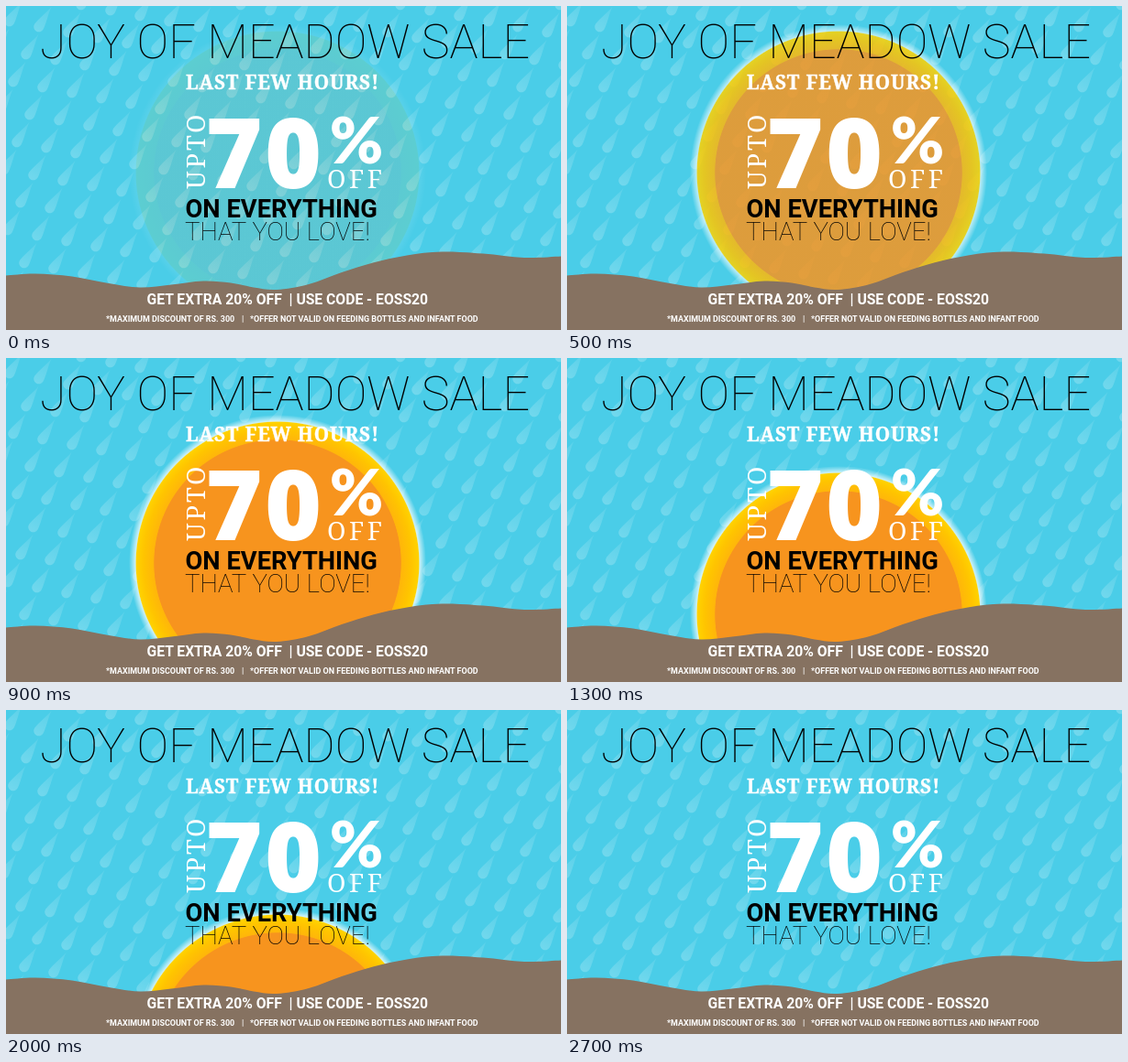
These frames come from a looping animation (605 px wide and 354 px high, 2.8 s). An HTML page:

```html
<!DOCTYPE html>
<html lang="en">
<head>
<meta charset="utf-8">
<title>Sale banner</title>
<style>
  html, body { margin: 0; width: 100%; height: 100%; overflow: hidden; background: #4acde8; }
  svg { display: block; width: 605px; height: 354px; }
  .sans { font-family: Roboto, sans-serif; }
  .slab { font-family: "Noto Serif", serif; fill: #fff; }
  .figure { font-family: "Open Sans", sans-serif; font-weight: 800; fill: #fff; text-anchor: middle; }
  .percent { font-family: Lato, sans-serif; font-weight: 900; fill: #fff; text-anchor: middle; }
  .thin { font-weight: 100; fill: #000; }
  .note { font-weight: 700; fill: #fff; }
</style>
</head>
<body>
<svg viewBox="0 0 605 354" xmlns="http://www.w3.org/2000/svg">
  <defs>
    <linearGradient id="dropFill" x1="0" y1="0" x2="0" y2="1">
      <stop offset="0" stop-color="#fff" stop-opacity=".08"/>
      <stop offset="1" stop-color="#fff" stop-opacity=".22"/>
    </linearGradient>
    <path id="drop" d="M0-18C1-9 5.5 2 5.5 8A5.5 5.5 0 0 1-5.5 8C-5.5 2-1-9 0-18Z" fill="url(#dropFill)"/>
    <radialGradient id="sunFill" gradientUnits="userSpaceOnUse" cx="0" cy="0" r="162">
      <stop offset="0" stop-color="#f7941e"/>
      <stop offset=".829" stop-color="#f7941e"/>
      <stop offset=".834" stop-color="#ffb60a"/>
      <stop offset=".9" stop-color="#ffc400"/>
      <stop offset=".95" stop-color="#ffd200"/>
      <stop offset=".957" stop-color="#fff" stop-opacity=".7"/>
      <stop offset="1" stop-color="#fff" stop-opacity="0"/>
    </radialGradient>
  </defs>

  <rect width="605" height="354" fill="#4acde8"/>
  <g id="rain"></g>
  <circle id="sun" r="162" fill="url(#sunFill)"/>
  <path id="dune" fill="#867261"/>

  <text class="sans thin" x="304" y="57" font-size="52" text-anchor="middle">JOY OF MEADOW SALE</text>

  <text class="slab" x="301.5" y="91" font-size="20.8" font-weight="900" letter-spacing=".9"
        text-anchor="middle" stroke="#fff" stroke-width=".4">LAST FEW HOURS!</text>
  <text class="slab" transform="translate(217 200) rotate(-90)" font-size="27.5" font-weight="200"
        letter-spacing="2.8">UPTO</text>
  <text class="figure" x="248.5" y="199" font-size="106">7</text>
  <text class="figure" x="313" y="199" font-size="106">0</text>
  <text class="percent" x="382" y="172" font-size="70">%</text>
  <text class="slab" x="350" y="199" font-size="27.5" font-weight="200" letter-spacing="3.5">OFF</text>

  <text class="sans" x="195.5" y="231" font-size="27.3" font-weight="700">ON EVERYTHING</text>
  <text class="sans thin" x="195" y="256" font-size="27.6">THAT YOU LOVE!</text>

  <g class="sans note" font-size="15.7">
    <text x="153.5" y="326">GET EXTRA 20% OFF</text>
    <text x="308.5" y="326">| USE CODE - EOSS20</text>
  </g>
  <g class="sans note" font-size="8.95">
    <text x="109" y="344.5">*MAXIMUM DISCOUNT OF RS. 300</text>
    <text x="257" y="344.5">|</text>
    <text x="266" y="344.5">*OFFER NOT VALID ON FEEDING BOTTLES AND INFANT FOOD</text>
  </g>
</svg>
<script>
  const LOOP = 2800, STEP = 100;
  const FULL_STEP = 6, FALL = 14, START_Y = 182;
  const byId = id => document.getElementById(id);
  const sun = byId("sun");

  // Slanted lattice of raindrops
  function makeRain() {
    let drops = "";
    for (let row = -6; row < 13; row++) {
      for (let col = -4; col < 26; col++) {
        const x = 8 + 32 * col - 14 * row;
        const y = 10 + 6 * col + 30 * row;
        if (x > -20 && x < 625 && y > -25 && y < 325) {
          drops += `<use href="#drop" transform="translate(${x} ${y}) rotate(32)"/>`;
        }
      }
    }
    byId("rain").innerHTML = drops;
  }

  // Smooth curve through points (Catmull-Rom)
  function smooth(pts) {
    const at = i => pts[Math.max(0, Math.min(pts.length - 1, i))];
    let d = `M${pts[0]}`;
    for (let i = 0; i < pts.length - 1; i++) {
      const [a, b, c, e] = [at(i - 1), at(i), at(i + 1), at(i + 2)];
      const p = [0, 1].map(k => b[k] + (c[k] - a[k]) / 6);
      const q = [0, 1].map(k => c[k] - (e[k] - b[k]) / 6);
      d += `C${p} ${q} ${c}`;
    }
    return d;
  }

  function makeDune() {
    const ridge = [
      [0, 294.5], [32, 292.5], [72, 295.5], [112, 303], [146, 307.5], [180, 304.5],
      [215, 300.5], [245, 302.5], [270, 307.5], [295, 310], [330, 304], [366, 291],
      [400, 280.5], [437, 272.5], [475, 268.5], [520, 270.5], [565, 275], [605, 273.5]
    ];
    byId("dune").setAttribute("d", smooth(ridge) + "V354H0Z");
  }

  function draw(ms) {
    const step = Math.floor((ms % LOOP) / STEP);
    const y = START_Y + FALL * Math.max(0, step - FULL_STEP);
    sun.setAttribute("transform", `translate(296 ${y})`);
    sun.setAttribute("opacity", Math.min(1, 0.1 + 0.15 * step));
  }

  makeRain();
  makeDune();
  const start = performance.now();
  function tick() {
    draw(performance.now() - start);
    requestAnimationFrame(tick);
  }
  tick();
</script>
</body>
</html>
```
